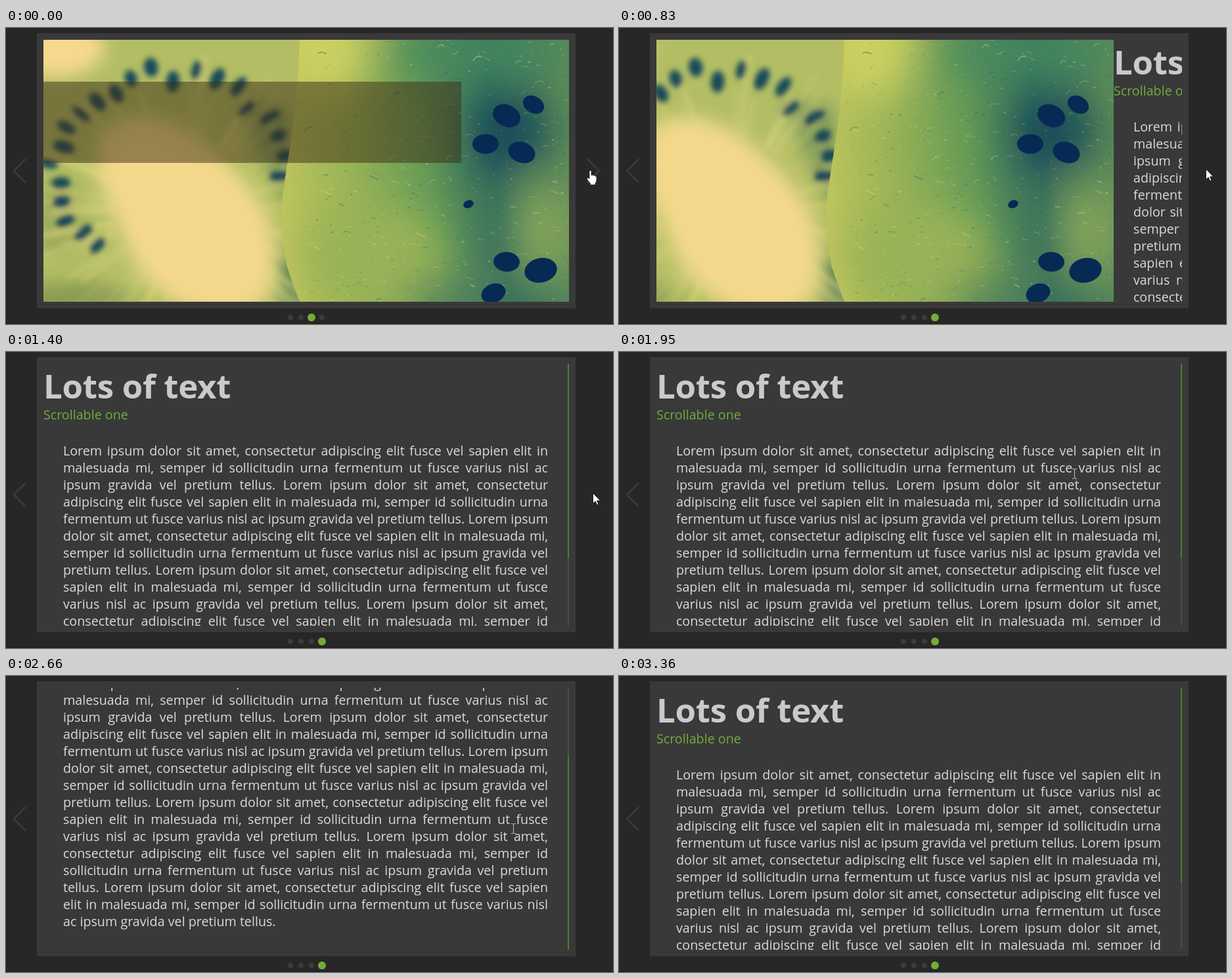
Write an HTML page that moves like this. It is 924 by 452 pixels and loops after 3490 ms.

```html
<!DOCTYPE html>
<html lang="en">
<head>
<meta charset="utf-8">
<title>Content slider</title>
<style>
  html, body { margin: 0; height: 100%; overflow: hidden; background: #272727; }
  svg { display: block; width: 924px; height: 452px; }
  text { font: 19.7px "Open Sans", "Noto Sans", sans-serif; fill: #dadada; }
  #title { font-size: 51px; font-weight: 700; letter-spacing: -.3px; fill: #cacaca; }
  #sub { fill: #70ae3a; }
  .nav { fill: none; stroke: #3b3b3b; stroke-width: 2.5; }
</style>
</head>
<body>
<svg viewBox="0 0 924 452">
  <defs>
    <clipPath id="view"><rect x="57" y="18" width="800" height="400"/></clipPath>
    <clipPath id="half"><path id="cut" d="M57 18H447C445 110 434 170 424 235Q414 300 428 365Q438 395 447 418H57Z"/></clipPath>
    <filter id="soft" filterUnits="userSpaceOnUse" x="0" y="0" width="924" height="452"><feGaussianBlur stdDeviation="4"/></filter>
    <filter id="haze" filterUnits="userSpaceOnUse" x="-60" y="-60" width="1040" height="570"><feGaussianBlur stdDeviation="13"/></filter>
    <filter id="fog" filterUnits="userSpaceOnUse" x="-120" y="-120" width="1160" height="690"><feGaussianBlur stdDeviation="32"/></filter>
    <linearGradient id="flesh" gradientUnits="userSpaceOnUse" x1="420" y1="240" x2="857" y2="200">
      <stop offset="0" stop-color="#bec45d"/>
      <stop offset=".25" stop-color="#96b256"/>
      <stop offset=".5" stop-color="#659a56"/>
      <stop offset=".75" stop-color="#2f6a5b"/>
      <stop offset="1" stop-color="#5a8957"/>
    </linearGradient>
  </defs>

  <rect y="450" width="924" height="2" fill="#271f22"/>
  <rect x="47" y="8" width="820" height="420" fill="#393939"/>
  <path class="nav" d="M30 200L12 218L30 236"/>
  <path class="nav" id="next" d="M885 200L903 218L885 236"/>
  <g id="dots"></g>

  <g clip-path="url(#view)">
    <g id="photo"><g clip-path="url(#view)">
      <rect x="57" y="18" width="800" height="400" fill="url(#flesh)"/>
      <g filter="url(#fog)">
        <ellipse cx="480" cy="20" rx="75" ry="90" fill="#cdd062"/>
        <ellipse cx="720" cy="35" rx="150" ry="35" fill="#468a5f"/>
        <ellipse cx="560" cy="350" rx="110" ry="80" fill="#98b357"/>
        <ellipse cx="690" cy="410" rx="80" ry="30" fill="#4b7f5c"/>
        <ellipse cx="820" cy="310" rx="50" ry="80" fill="#86a45a"/>
        <ellipse cx="765" cy="160" rx="55" ry="60" fill="#174a59"/>
      </g>
      <g id="flecks" fill="none"></g>
      <g id="pips" fill="#062a54"></g>
      <g clip-path="url(#half)">
        <use href="#cut" fill="#b3be64"/>
        <g filter="url(#haze)">
          <ellipse cx="75" cy="30" rx="75" ry="45" fill="#f6d98c"/>
          <ellipse cx="80" cy="290" rx="40" ry="60" fill="#a1ac5c"/>
          <ellipse cx="105" cy="415" rx="90" ry="28" fill="#8b9c52"/>
          <path d="M350 110L430 120L445 290L405 230Z" fill="#7f9a5a"/>
          <path d="M415 350L440 340L460 430L420 430Z" fill="#5c7f55"/>
        </g>
        <g filter="url(#soft)">
          <g id="rays" stroke="#e0d884"></g>
          <g id="seeds" fill="#17485a"></g>
        </g>
        <path id="core" d="M145 185C155 130 230 130 280 165S395 260 402 320S400 435 340 435S215 405 185 325S135 235 145 185Z" fill="#f4d88b" stroke="#e3d584" stroke-width="14" filter="url(#haze)"/>
      </g>
      <rect id="caption" x="57" y="82" height="124" fill="#3c2d14" opacity=".5"/>
    </g></g>

    <g id="page">
      <g id="copy">
        <text id="title" x="57" y="71">Lots of text</text>
        <text id="sub" x="57" y="103">Scrollable one</text>
      </g>
      <rect x="855" y="18" width="2" height="400" fill="#4c4c4c"/>
      <rect id="thumb" x="855" y="18" width="2" height="296.3" fill="#4b8326"/>
    </g>
  </g>

  <path id="hand" fill="#fff" stroke="#222" stroke-width=".8" d="M4 13V2Q4 .5 5.500 .5T7 2V8Q9 6.500 10 8.300Q12 7 12.700 9Q15 8.500 15 11V15Q15 18 13 20V22.500H5.500V20.500L.8 14.500Q-.2 12.500 1.500 12Q2.800 11.800 4 13Z"/>
  <path id="arrow" fill="#fff" stroke="#111" stroke-width=".9" d="M.5 .5V16.500L4.200 13L6.700 18.500L9 17.500L6.600 12H11.700Z"/>
  <path id="beam" fill="none" stroke="#c4c4c4" d="M-3 -7.500H-1L.5 -6.500L2 -7.500H4M.5 -6.500V6.500M-3 7.500H-1L.5 6.500L2 7.500H4"/>
</svg>

<script>
const LOOP = 3490, STEPS = 25;
const $ = id => document.getElementById(id);

function add(parent, tag, attrs) {
  const el = document.createElementNS("http://www.w3.org/2000/svg", tag);
  for (const k in attrs) el.setAttribute(k, attrs[k]);
  return $(parent).appendChild(el);
}
const set = (id, k, v) => $(id).setAttribute(k, v);
const move = (id, x, y) => set(id, "transform", `translate(${x} ${y})`);
const show = (id, on) => set(id, "visibility", on ? "visible" : "hidden");

let seed = 11;
const rnd = (a, b) => {
  seed = (seed * 16807) % 2147483647;
  return a + (b - a) * seed / 2147483647;
};

// Photo details
const blob = (parent, cx, cy, rx, ry, tilt) =>
  add(parent, "ellipse", { cx, cy, rx, ry, transform: `rotate(${tilt} ${cx} ${cy})` });

for (let a = 2.3; a < 6.4; a += .19) {
  const r = rnd(.92, 1.08);
  blob("seeds", 245 + 172 * r * Math.cos(a), 225 + 155 * r * Math.sin(a),
    rnd(13, 18), rnd(7, 11), a * 57.3);
}
for (const [x, y, r] of [[762, 134, 22], [803, 117, 17], [730, 177, 20], [785, 190, 21],
                         [762, 357, 20], [814, 370, 25], [742, 405, 19], [704, 269, 8]])
  blob("pips", x, y, r, r * .75, rnd(-25, 30));

for (let i = 0; i < 80; i++) {
  const a = rnd(0, 6.283), c = Math.cos(a), s = Math.sin(a), r = rnd(170, 260);
  add("rays", "path", {
    d: `M${275 + 110 * c} ${280 + 110 * s}L${275 + r * c} ${280 + r * s}`,
    "stroke-width": rnd(2, 6), opacity: rnd(.2, .6)
  });
}
for (let i = 0; i < 700; i++) {
  const big = i % 4 === 0, w = big ? rnd(4, 14) : rnd(1, 4), h = rnd(-.5, .5) * w;
  add("flecks", "path", {
    d: `M${rnd(440, 850)} ${rnd(18, 418)}q${w / 3} ${h - w / 3} ${w} ${h}`,
    stroke: i % 3 ? "#d3d684" : "#2a655a", "stroke-width": rnd(.7, 2), opacity: rnd(.1, .5)
  });
}

// Justified paragraph
const sentence = "Lorem ipsum dolor sit amet, consectetur adipiscing elit fusce vel sapien elit in " +
  "malesuada mi, semper id sollicitudin urna fermentum ut fusce varius nisl ac " +
  "ipsum gravida vel pretium tellus. ";
const WIDTH = 738;
const words = sentence.repeat(6).trim().split(" ");
for (let y = 158; words.length; y += 26) {
  const line = add("copy", "text", { x: 87, y });
  const fits = n => {
    line.textContent = words.slice(0, n).join(" ");
    return line.getComputedTextLength() <= WIDTH + 6;
  };
  let n = 1;
  while (n < words.length && fits(n + 1)) n++;
  fits(n);
  words.splice(0, n);
  if (words.length)
    line.style.wordSpacing = (WIDTH - line.getComputedTextLength()) / (n - 1) + "px";
}

const dots = [0, 1, 2, 3].map(i => add("dots", "circle", { cx: 433 + 16 * i, cy: 442 }));

// All motion below is timed in screen refreshes
const decay = (k, start, rate) => Math.exp(-rate * Math.max(0, k - start));

// Eases from 1 to 0 with a small overshoot
function backOut(k, start, span) {
  const u = Math.min(1, Math.max(0, 1 - (k - start) / span)), s = .805;
  return (s + 1) * u ** 3 - s * u ** 2;
}

const path = [[11, 893, 215], [12, 868, 209], [13, 797, 197], [14, 693, 186], [18, 695, 190],
              [19, 772, 233], [21, 855, 339], [22, 882, 421], [23, 896, 449]];

function pointerAt(k) {
  const i = path.findIndex(p => p[0] >= k);
  if (i < 1) return path.at(i).slice(1);
  const [k0, x0, y0] = path[i - 1], [k1, x1, y1] = path[i], f = (k - k0) / (k1 - k0);
  return [Math.round(x0 + (x1 - x0) * f), Math.round(y0 + (y1 - y0) * f)];
}

function draw(k) {
  const clicked = k >= 6;
  const left = Math.round(800 * backOut(k, 5.882, 3.3));
  const scroll = Math.round(140 * (1 - decay(k, 14.05, 3)) * decay(k, 19.815, 3));

  move("photo", left - 800, 0);
  move("page", left, 0);
  move("copy", 0, -scroll);
  move("thumb", 0, scroll * 103.7 / 140);
  set("caption", "width", 800 - 164 * decay(k, 0, 1.5));
  show("caption", !clicked);
  show("next", !clicked);
  dots.forEach((dot, i) => {
    const on = i === (clicked ? 3 : 2);
    dot.setAttribute("r", on ? 6 : 4);
    dot.setAttribute("fill", on ? "#73ad37" : "#3c3c3c");
  });

  const overText = k >= 13 && k <= 20;
  show("hand", !clicked);
  show("beam", overText);
  show("arrow", clicked && !overText && k < 24);
  move("hand", 884, 217);
  for (const id of ["arrow", "beam"]) move(id, ...pointerAt(k));
}

// The screen refreshes in even steps, slightly ahead of the beat
const start = performance.now();
let shown = 0;
function frame(now) {
  const t = Math.max(0, now - start) % LOOP;
  const k = Math.min(STEPS - 1, Math.floor((t + 20) * STEPS / LOOP));
  if (k !== shown) draw(shown = k);
  requestAnimationFrame(frame);
}
draw(shown);
requestAnimationFrame(frame);
</script>
</body>
</html>
```
